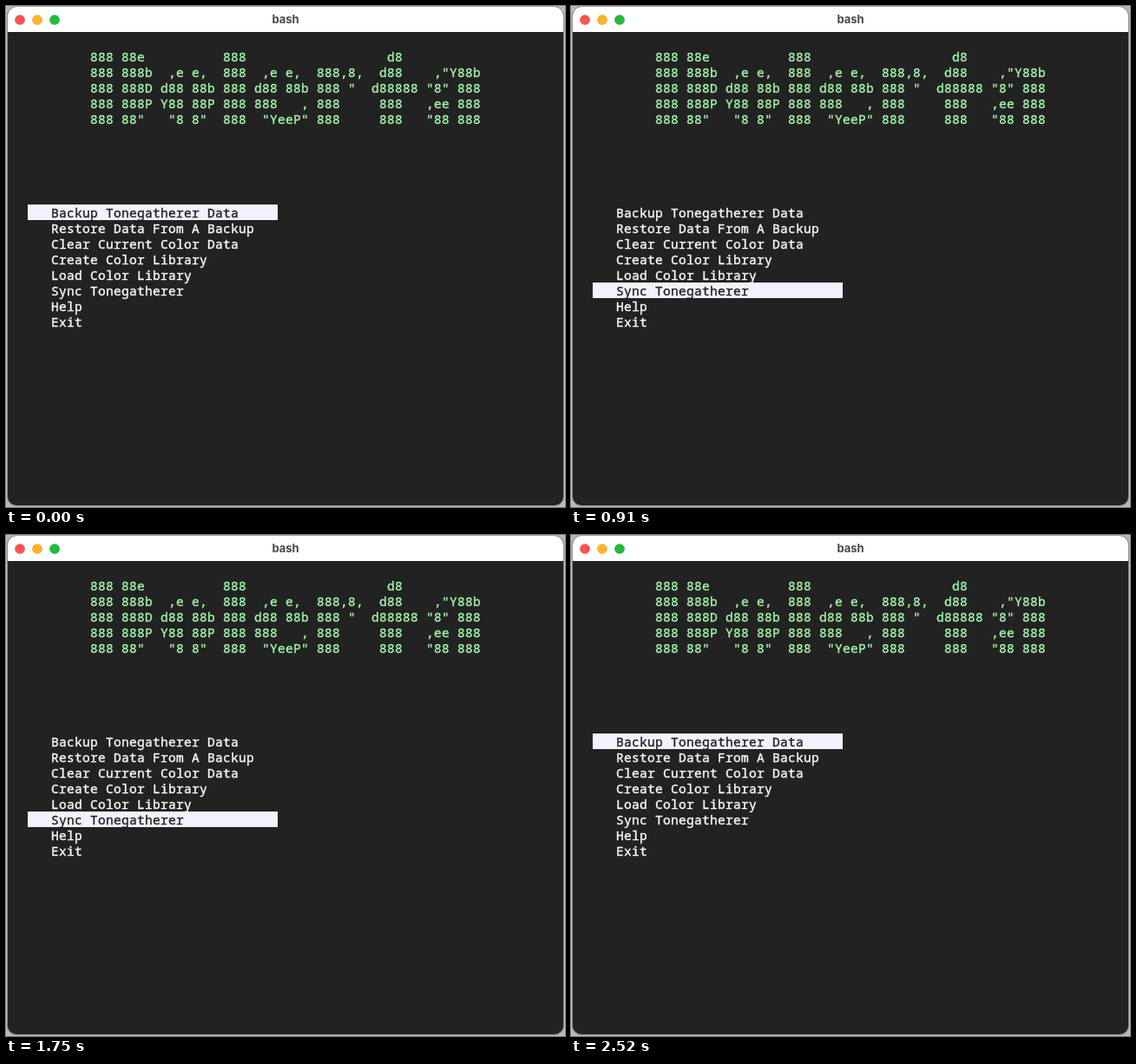
An HTML page for the animation above (2.59 s loop, 644 by 578 pixels).

```html
<!DOCTYPE html>
<html lang="en">
<head>
<meta charset="utf-8">
<title>Terminal menu</title>
<style>
  html, body { margin: 0; width: 100%; height: 100%; overflow: hidden; background: #b9b9b9; }
  svg { display: block; width: 644px; height: 578px; }
  .mono text {
    font: 14.5px "Noto Sans Mono", "DejaVu Sans Mono", monospace;
    letter-spacing: .3px;
    white-space: pre;
    fill: currentColor;
    stroke: currentColor;
    stroke-width: .4px;
  }
  .title { font: 700 13px Inter, sans-serif; fill: #484848; text-anchor: middle; }
  .lights circle { stroke: #0002; stroke-width: .5px; }
  #banner { color: #a2f5a9; }
  #menu { color: #fafafa; }
</style>
</head>
<body>
<svg viewBox="0 0 644 578">
  <defs>
    <clipPath id="window"><rect x="2" y="1" width="640" height="575" rx="10"/></clipPath>
  </defs>
  <rect x="1" y="0.5" width="642" height="576.5" rx="11" fill="#8c8c8c"/>
  <g clip-path="url(#window)">
    <rect width="644" height="578" fill="#222"/>
    <rect width="644" height="30" fill="#fff"/>
  </g>
  <g class="lights">
    <circle cx="16" cy="16" r="5.8" fill="#fc544f"/>
    <circle cx="36" cy="16" r="5.8" fill="#fdb32b"/>
    <circle cx="56" cy="16" r="5.8" fill="#22bb3e"/>
  </g>
  <text class="title" x="322" y="20">bash</text>
  <rect id="bar" x="25" y="229" width="288" height="18" fill="#f4f0fe"/>
  <g class="mono" id="banner"></g>
  <g class="mono" id="menu"></g>
</svg>
<script>
const LOOP = 2590;
const LINE = 18;
const DARK = '#222', LIGHT = '#fafafa';

// Each glyph is five rows of equal width.
const glyphs = {
  D: ['888 88e ', '888 888b', '888 888D', '888 888P', '888 88" '],
  o: ['       ', ' ,e e, ', 'd88 88b', 'Y88 88P', ' "8 8" '],
  l: ['888', '888', '888', '888', '888'],
  e: ['       ', ' ,e e, ', 'd88 88b', '888   ,', ' "YeeP"'],
  r: ['      ', '888,8,', '888 " ', '888   ', '888   '],
  t: ['  d8  ', ' d88  ', 'd88888', ' 888  ', ' 888  '],
  a: ['       ', ' ,"Y88b', '"8" 888', ',ee 888', '"88 888']
};
const items = [
  'Backup Tonegatherer Data',
  'Restore Data From A Backup',
  'Clear Current Color Data',
  'Create Color Library',
  'Load Color Library',
  'Sync Tonegatherer',
  'Help',
  'Exit'
];

// Time in ms and the row selected from then on.
const steps = [
  [0, 0], [140, 1], [350, 2], [560, 3], [700, 4], [910, 5], [1050, 6], [1260, 7],
  [1400, 6], [1610, 5], [1820, 4], [1960, 3], [2170, 2], [2380, 1], [2520, 0], [LOOP, 0]
];

function addLine(groupId, x, y, content) {
  const text = document.createElementNS('http://www.w3.org/2000/svg', 'text');
  text.setAttribute('x', x);
  text.setAttribute('y', y);
  text.textContent = content;
  document.getElementById(groupId).append(text);
  return text;
}

function play(element, styleForRow) {
  const frames = steps.map(([time, row]) => ({
    offset: time / LOOP, easing: 'step-end', ...styleForRow(row)
  }));
  element.animate(frames, { duration: LOOP, iterations: Infinity });
}

for (let row = 0; row < 5; row++) {
  const line = [...'Dolerta'].map(letter => glyphs[letter][row]).join(' ');
  addLine('banner', 97, 64 + row * LINE, line);
}

items.forEach((label, index) => {
  const text = addLine('menu', 52, 244 + index * LINE, label);
  play(text, row => ({ color: row === index ? DARK : LIGHT }));
});

play(document.getElementById('bar'), row => ({ transform: `translateY(${row * LINE}px)` }));
</script>
</body>
</html>
```
